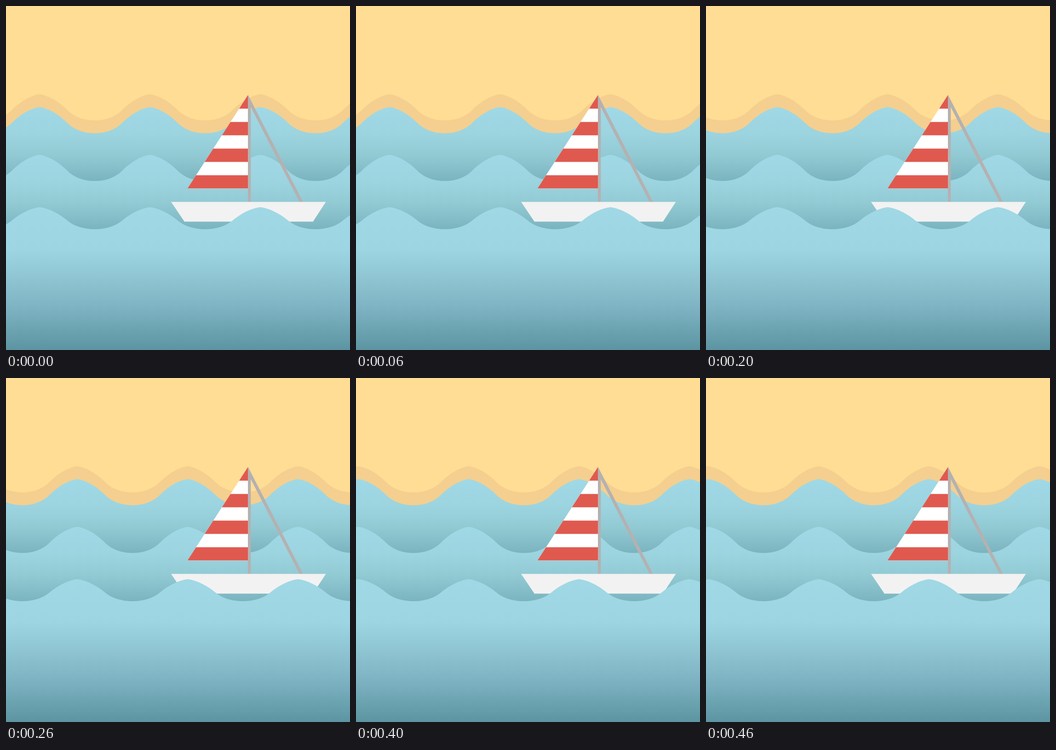
Animation, 748 px wide and 749 px high, one loop 0.5 s. Source, as an HTML page:

```html
<!DOCTYPE html>
<html lang="en">
<head>
<meta charset="utf-8">
<title>Sailboat</title>
<style>
  html, body { margin: 0; width: 100%; height: 100%; overflow: hidden; background: #ffdd94; }
  svg { display: block; }
</style>
</head>
<body>
<svg width="748" height="749" viewBox="0 0 748 749">
  <defs>
    <linearGradient id="back" gradientUnits="userSpaceOnUse" x1="0" y1="220" x2="0" y2="381">
      <stop offset="0" stop-color="#a0d9e6"/>
      <stop offset=".35" stop-color="#9cd4e0"/>
      <stop offset=".65" stop-color="#92cad4"/>
      <stop offset="1" stop-color="#7ab4be"/>
    </linearGradient>
    <linearGradient id="middle" href="#back" y1="324" y2="486"/>
    <linearGradient id="front" gradientUnits="userSpaceOnUse" x1="0" y1="438" x2="0" y2="749">
      <stop offset="0" stop-color="#a0d8e5"/>
      <stop offset=".3" stop-color="#9dd5e3"/>
      <stop offset=".5" stop-color="#8fc5d2"/>
      <stop offset=".7" stop-color="#7eb3c3"/>
      <stop offset="1" stop-color="#5c95a1"/>
    </linearGradient>
  </defs>
  <rect width="748" height="749" fill="#ffdd94"/>
  <path class="wave" data-top="192" data-height="57" fill="#f4cf8f"/>
  <path class="wave" data-top="220" data-height="57" fill="url(#back)"/>
  <path class="wave" data-top="324" data-height="57" fill="url(#middle)"/>
  <g id="boat">
    <path d="M526 194V397.5H394.5Z" fill="#fff"/>
    <clipPath id="sail"><path d="M526 194V397.5H394.5Z"/></clipPath>
    <path clip-path="url(#sail)" fill="#e0594f"
      d="M390 194H526V223.5H390ZM390 252.5H526V281.5H390ZM390 310.5H526V339.5H390ZM390 368.5H526V397.5H390Z"/>
    <path d="M526 193L532.3 206V427H526ZM526 193L646 427H638.5L526 208Z" fill="#b5b1b1"/>
    <path d="M359 426.5H695.5L667.5 469.5H388Z" fill="#f2f2f2"/>
  </g>
  <path class="wave" data-top="438" data-height="48" fill="url(#front)"/>
</svg>
<script>
const PERIOD = 240, FIRST_CREST = 73 - 2 * PERIOD, HOLD = 100;
const shifts = [0, 45, 82, 123, 172];
const waves = [...document.querySelectorAll('.wave')];

// One period, crest to crest: x offset and depth as a fraction of the wave height.
const curve = [
  [20, .05], [43, .3], [60, .6],
  [75, .87], [97, 1], [120, 1],
  [143, 1], [165, .87], [180, .6],
  [197, .3], [220, .05], [240, 0]
];

function wavePath(top, height) {
  let d = `M${FIRST_CREST} ${top}C`;
  for (let i = 0; i < 6; i++)
    for (const [x, depth] of curve)
      d += `${FIRST_CREST + i * PERIOD + x} ${top + depth * height} `;
  return d + 'V749H' + FIRST_CREST + 'Z';
}

for (const wave of waves)
  wave.setAttribute('d', wavePath(+wave.dataset.top, +wave.dataset.height));

const start = performance.now();
function draw(now) {
  const step = Math.floor(Math.max(0, now - start) / HOLD) % shifts.length;
  for (const wave of waves) wave.setAttribute('transform', `translate(${shifts[step]})`);
  requestAnimationFrame(draw);
}
draw(start);
</script>
</body>
</html>
```
